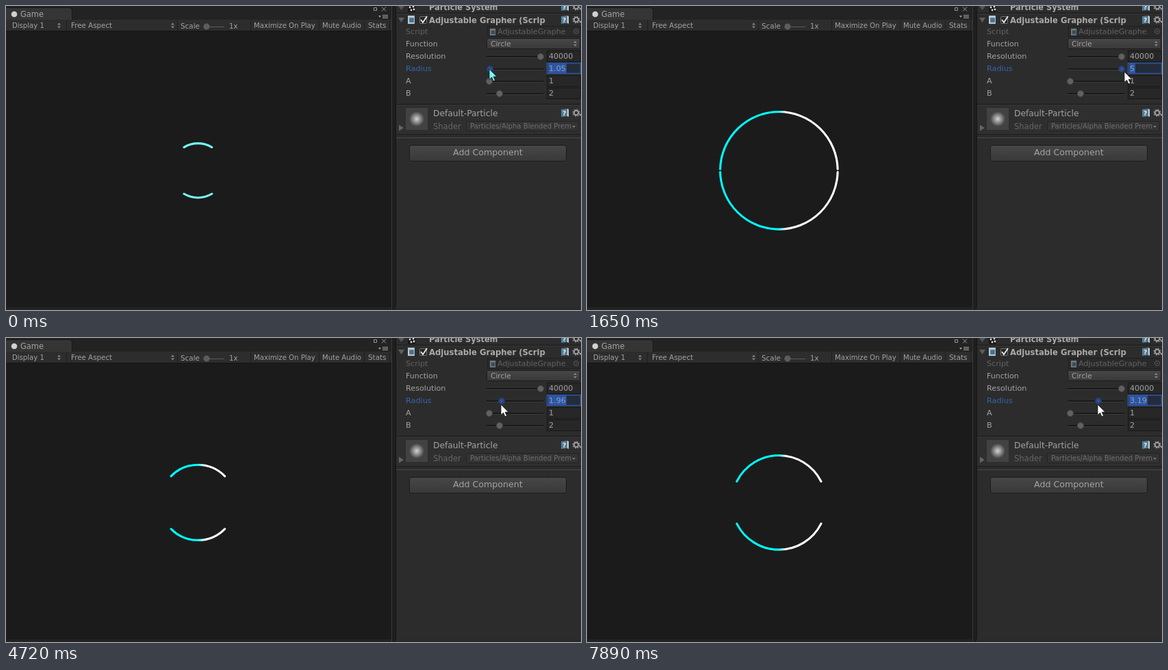
An HTML page for the animation above (7990 ms loop, 840 by 444 pixels).

```html
<!DOCTYPE html>
<html lang="en">
<head>
<meta charset="utf-8">
<title>Radius slider</title>
<style>
html, body { margin: 0; width: 100%; height: 100%; overflow: hidden; background: #1b1b1b; }
svg { display: block; width: 840px; height: 444px; }
text { font-family: "DejaVu Sans", Verdana, sans-serif; fill: #a3a3a3; white-space: pre; }
.bold { font-weight: bold; fill: #aaa; }
</style>
</head>
<body>
<svg id="stage" viewBox="0 0 840 444" xmlns="http://www.w3.org/2000/svg">
  <defs>
    <linearGradient id="tint" gradientUnits="userSpaceOnUse" x1="279" x2="291" y1="0" y2="0">
      <stop stop-color="#0ff"/><stop offset="1" stop-color="#fff"/>
    </linearGradient>
    <linearGradient id="raised" x2="0" y2="1">
      <stop stop-color="#474747"/><stop offset="1" stop-color="#393939"/>
    </linearGradient>
    <radialGradient id="glow">
      <stop stop-color="#d4d4d4"/><stop offset=".3" stop-color="#a8a8a8"/>
      <stop offset="1" stop-color="#424242"/>
    </radialGradient>
    <clipPath id="shaderClip"><rect x="673" y="168" width="153" height="16"/></clipPath>
  </defs>
  <g id="ui"></g>
  <path id="curve" fill="none" stroke-width="3.1" stroke-linecap="round"/>
  <rect id="selection" x="792" y="84" height="14" fill="#2f559d"/>
  <text id="value" x="793" y="95" font-size="11.2" style="fill:#86a0cf"></text>
  <g id="knob"><circle cy="92" r="4.6" fill="#2b457c" stroke="#243a68"/><circle cy="92" r="1.8" fill="#38569a"/></g>
  <path id="cursor" d="M0 0V15.5L3.6 12.2L6 17.8L8.6 16.7L6.2 11.2H11Z" stroke="#111" stroke-width=".8"/>
</svg>
<script>
const LOOP = 7990;
const CENTER = { x: 280.4, y: 240.3 };
const UNIT = 38.5;

// Screen updates: first time, last time, number of steps.
const BURSTS = [
  [80, 850, 11], [930, 1650, 10], [1730, 2050, 5], [2200, 2990, 11], [3060, 3830, 11],
  [3930, 4720, 11], [4780, 5550, 11], [5630, 5800, 3], [6400, 7180, 11], [7280, 7890, 9]
];
// time, slider value, plotted value, cursor x, cursor y
const KEYS = [
  [0, 1.05, 1.06, 706, 92],
  [850, 2.8, 2.76, 741, 93],
  [1090, 3.56, 3.56, 756, 94],
  [1570, 4.9, 4.86, 781, 96],
  [1650, 5, 4.97, 785, 96],
  [1890, 4.93, 4.95, 780, 97],
  [2050, 5, 5, 783, 97],
  [2200, 5, 5, 782, 97],
  [2990, 4.68, 4.77, 774, 97],
  [3676, 3.61, 3.77, 754, 97],
  [3830, 3.42, 3.5, 750, 97],
  [4720, 1.96, 2.04, 723, 97],
  [5350, 1, 1.04, 705, 97],
  [5550, 1, 1, 698, 96],
  [5800, 1, 1, 684, 96],
  [6320, 1, 1, 684, 96],
  [6720, 1, 1, 705, 97],
  [7024, 1.53, 1.53, 716, 97],
  [7180, 1.78, 1.77, 720, 97],
  [7890, 3.19, 3.2, 746, 97]
];

const el = id => document.getElementById(id);
const rect = (x, y, w, h, fill, more = '') =>
  `<rect x="${x}" y="${y}" width="${w}" height="${h}" fill="${fill}" ${more}/>`;
const box = (x, y, w, h, fill, line, r = 0) =>
  rect(x + .5, y + .5, w - 1, h - 1, fill, `stroke="${line}" rx="${r}"`);
const path = (d, fill, more = '') => `<path d="${d}" fill="${fill}" ${more}/>`;
const line = (d, color, width = 1) => path(d, 'none', `stroke="${color}" stroke-width="${width}"`);
const dot = (x, y, r, fill, more = '') => `<circle cx="${x}" cy="${y}" r="${r}" fill="${fill}" ${more}/>`;
const text = (x, y, size, str, more = '') =>
  `<text x="${x}" y="${y}" font-size="${size}" ${more}>${str}</text>`;
const spinner = (x, y) =>
  path(`M${x - 2.5} ${y - 1}h5l-2.5 -3zM${x - 2.5} ${y + 1}h5l-2.5 3z`, '#858585');

const track = y => rect(702, y - 1, 83, 2, '#191919') + rect(702, y + 1, 83, 1, '#3b3b3b');
const numberRow = (name, y, knobX, value) =>
  text(584, y + 4, 11.2, name) + track(y + 1) +
  dot(knobX, y + 1, 4.5, '#616161', 'stroke="#474747"') +
  box(790, y - 8, 50, 17, '#272727', '#171717') + text(793, y + 4, 11.1, value);
const page = (x, y, s) =>
  rect(x, y, 9 * s, 11 * s, '#bcc6cc') + rect(x + 2 * s, y + 3 * s, 6 * s, 6 * s, '#3f7396');
const headerIcons = y =>
  path(`M811 ${y - 5}l9 -1v11l-9 1z`, '#527c94') + path(`M820 ${y - 6}l2 1v11l-2 -1z`, '#c9d3d8') +
  text(813, y + 4, 9, '?', 'font-weight="bold" style="fill:#eee"') +
  dot(833, y, 3.2, 'none', 'stroke="#9b9b9b" stroke-width="2"') +
  dot(833, y, 4.8, 'none', 'stroke="#9b9b9b" stroke-width="1.4" stroke-dasharray="1.9 1.87"') +
  path(`M837 ${y + 2}h4l-2 3z`, '#9b9b9b');

function gamePanel() {
  return rect(0, 0, 840, 444, '#1b1b1b') + rect(0, 0, 563, 20, '#232323') +
    path('M0 20V3H93Q96 3 96 6V20Z', '#353535') + line('M0 2.5H93Q96.5 3 96.5 6V20', '#191919') +
    rect(0, 20, 563, 16, '#2d2d2d') + rect(0, 36, 563, 1, '#151515') +
    rect(0, 440, 563, 4, '#232323') +
    dot(12, 12, 4.3, '#d0d0d0') + text(21, 16, 11.4, 'Game') +
    text(9, 32, 10.1, 'Display 1') + text(95, 32, 10.3, 'Free Aspect') +
    text(255, 33, 10.4, 'Scale') + text(326, 33, 10.1, '1x') +
    text(362, 32, 10.12, 'Maximize On Play') + text(462, 32, 10.06, 'Mute Audio') +
    text(529, 32, 10.4, 'Stats') + spinner(77.5, 28.5) + spinner(243.5, 28.5) +
    [88, 250, 357, 457, 523, 560].map(x => rect(x, 21, 1, 15, '#1f1f1f')).join('') +
    rect(288, 30, 31, 1, '#5b5b5b') + dot(293, 30, 4.5, '#5c5c5c') +
    line('M537.5 2.5h4v4h-4z', '#999') + line('M549 1.5l6 6m0 -6l-6 6', '#999') +
    path('M544 14h4l-2 3z', '#999') + line('M550 13.5h8m-8 2h8m-8 2h8', '#999');
}

function inspector() {
  return rect(563, 0, 1, 444, '#3a3a3a') + rect(564, 0, 5, 444, '#1e1e1e') +
    rect(569, 0, 271, 444, '#2c2c2c') + rect(569, 0, 1, 444, '#161616') +
    rect(569, 440, 271, 4, '#292929') +
    // component headers
    path('M573 0h9l-4.5 6z', '#555') + text(618, 6, 11.4, 'Particle System', 'class="bold"') +
    rect(587, 0, 11, 9, '#191919') +
    [[590, 2], [595, 1], [592, 6], [596, 5]].map(p => dot(...p, 1.4, '#ddd')).join('') + headerIcons(1) +
    rect(570, 10, 270, 1, '#181818') + rect(570, 11, 270, 1, '#383838') +
    path('M573 17h9l-4.5 7z', '#5e5e5e') + page(587, 14, 1.1) +
    box(604, 15, 11, 11, '#262626', '#777', 1) + line('M606 20l3 4l6 -9', '#eee', 1.8) +
    text(618, 24.5, 11.6, 'Adjustable Grapher (Scrip', 'class="bold"') + headerIcons(20) +
    // script reference
    text(584, 41, 11.2, 'Script', 'style="fill:#626262"') +
    box(703, 29, 137, 16, '#2a2a2a', '#202020') + `<g opacity=".5">${page(707, 33, .9)}</g>` +
    text(718, 41, 11.15, 'AdjustableGraphe', 'style="fill:#626262"') +
    dot(833, 37, 3.5, 'none', 'stroke="#5c5c5c"') + dot(833, 37, 1, '#5c5c5c') +
    // fields
    text(584, 59, 11, 'Function') + box(702, 47, 137, 16, 'url(#raised)', '#1c1c1c', 2) +
    text(708, 58.5, 10.6, 'Circle') + spinner(831.5, 55) +
    numberRow('Resolution', 73, 781, '40000') +
    text(584, 95, 11.25, 'Radius', 'style="fill:#3565b1"') + track(92) +
    rect(790.5, 83.5, 49, 15, '#242b39', 'stroke="#2b55a4" stroke-width="1.5"') +
    numberRow('A', 109, 706, '1') + numberRow('B', 127, 721, '2') +
    // material
    rect(570, 143, 270, 1, '#171717') + rect(570, 144, 270, 1, '#383838') +
    rect(570, 145, 270, 42, '#2f2f2f') +
    rect(584, 149, 32, 32, '#424242') + dot(600, 165, 11, 'url(#glow)') +
    path('M574 173.5v9l7 -4.5z', '#646464') +
    text(624, 161, 12.25, 'Default-Particle') + headerIcons(156) +
    text(624, 180, 11.5, 'Shader', 'style="fill:#666"') +
    box(672, 168, 165, 15, '#333', '#222', 2) +
    text(678, 179, 10.08, 'Particles/Alpha Blended Prem', 'style="fill:#707070" clip-path="url(#shaderClip)"') +
    path('M827 175h5l-2.5 3z', '#777') +
    rect(570, 187, 270, 1, '#1d1d1d') + rect(570, 192, 270, 1, '#474747') +
    box(589, 203, 230, 24, 'url(#raised)', '#1b1b1b', 3) +
    text(653, 218, 12.63, 'Add Component');
}

function snap(t) {
  let last = 0;
  for (const [from, to, steps] of BURSTS) {
    if (t < from) break;
    const gap = (to - from) / (steps - 1);
    last = from + gap * Math.min(steps - 1, Math.floor((t - from) / gap + 1e-6));
  }
  return last;
}

function pose(t) {
  const i = KEYS.findIndex(key => key[0] >= t);
  if (i === 0) return KEYS[0].slice(1);
  const a = KEYS[i < 0 ? KEYS.length - 1 : i - 1], b = KEYS[i < 0 ? KEYS.length - 1 : i];
  const k = b[0] > a[0] ? (t - a[0]) / (b[0] - a[0]) : 0;
  return a.slice(1).map((v, n) => v + (b[n + 1] - v) * k);
}

// x² + y² = r, sampled over |x| ≤ r / 2
function curvePath(r) {
  const radius = UNIT * Math.sqrt(r);
  const y = Math.max(2.2, Math.sqrt(Math.max(0, radius ** 2 - (UNIT * r / 2) ** 2)));
  const x = Math.sqrt(radius ** 2 - y ** 2);
  const arc = (side, sweep) =>
    `M${CENTER.x - x} ${CENTER.y + side * y}A${radius} ${radius} 0 0 ${sweep} ${CENTER.x + x} ${CENTER.y + side * y}`;
  return arc(-1, 1) + arc(1, 0);
}

function draw(now) {
  const t = now % LOOP;
  const [value, plotted, x, y] = pose(snap(Math.min(t + 12, LOOP - 1)));
  const label = String(+value.toFixed(2));
  const pale = t < 70;
  el('curve').setAttribute('d', curvePath(plotted));
  el('curve').setAttribute('stroke', pale ? '#76f8fa' : 'url(#tint)');
  el('value').textContent = label;
  el('selection').setAttribute('width', label.length > 1 ? label.length * 7.1 - 1.5 : 9);
  el('knob').setAttribute('transform', `translate(${Math.round(706 + (value - 1) * 18.75)} 0)`);
  el('cursor').setAttribute('transform', `translate(${Math.round(x)} ${Math.round(y)})`);
  el('cursor').setAttribute('fill', pale ? '#76f8fa' : '#fff');
}

el('ui').innerHTML = gamePanel() + inspector();
const start = performance.now();
(function tick() {
  draw(performance.now() - start);
  requestAnimationFrame(tick);
})();
</script>
</body>
</html>
```
